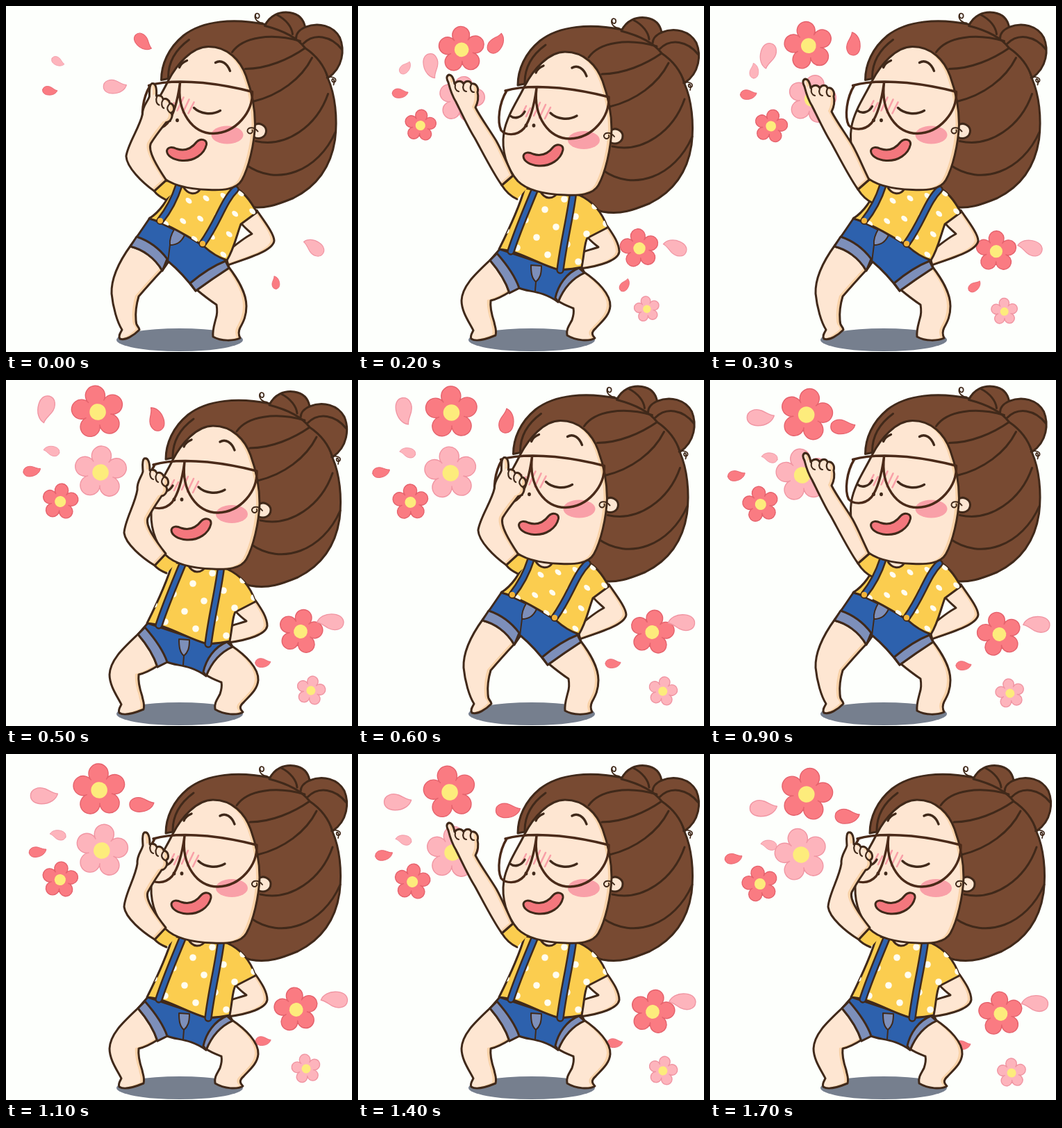
Animation, 498 px wide and 498 px high, one loop 1800 ms. Source, as an HTML page:

```html
<!DOCTYPE html>
<html>
<head>
<meta charset="utf-8">
<title>Dancing girl with petals</title>
<style>
html, body { margin: 0; width: 100%; height: 100%; overflow: hidden; background: #fdfffc; }
svg { display: block; width: 100vw; height: 100vh; }
</style>
</head>
<body>
<svg id="stage" viewBox="0 0 498 498" stroke-linecap="round" stroke-linejoin="round"></svg>
<script>
const STEP = 100, STEPS = 18, SETTLE = 5, SWING = 9; // steps until settled, steps per swing
const LINE = '#40291a', SKIN = '#fee6d2', SHADE = '#f9d2a8', HAIR = '#784a32', SHIRT = '#fbcd4f';
const BLUE = '#2d61ad', CUFF = '#7d8fba', RED = '#fa7b82', PINK = '#fdb4bc', BLUSH = '#f9a0a8';
const EDGE = { [RED]: '#e5626c', [PINK]: '#f095a2' };
const stage = document.getElementById('stage');

const lerp = (a, b, t) => a + (b - a) * t;
const clamp = t => Math.max(0, Math.min(1, t));

// Blend two paths that share the same commands.
function mix(a, b, t) {
  const nums = b.match(/-?[\d.]+/g);
  let i = 0;
  return a.replace(/-?[\d.]+/g, n => +lerp(+n, +nums[i++], t).toFixed(2));
}

const path = (d, fill = 'none', stroke = LINE, width = 3) =>
  `<path d="${d}" fill="${fill}" stroke="${stroke}" stroke-width="${width}"/>`;
const ellipse = (x, y, rx, ry, fill) => `<ellipse cx="${x}" cy="${y}" rx="${rx}" ry="${ry}" fill="${fill}"/>`;
const group = (transform, inner) => `<g transform="${transform}">${inner}</g>`;
const clipped = (id, d, inner) =>
  `<clipPath id="${id}"><path d="${d}"/></clipPath><g clip-path="url(#${id})">${inner}</g>`;

// Skin with a soft shadow along its right side.
const skin = (id, d) =>
  path(d, SHADE, 'none') + clipped(id, d, group('translate(-5 -1)', path(d, SKIN, 'none'))) + path(d);

// Body parts: [squat, stand]
const body = {
  legL: ['M192 364C170 385 150 402 149 424C149 440 160 455 166 467C164 471 161 475 163 479C170 484 186 479 198 474C200 466 197 462 196 455C192 443 190 432 191 424C200 422 208 418 219 411L226 390L205 355Z',
         'M180 344C164 366 151 390 152 414C154 434 160 455 167 466C165 470 161 475 164 479C172 482 184 474 192 466C191 460 187 462 187 452C186 440 188 428 191 418C203 404 212 394 225 380L232 355L192 328Z'],
  legR: ['M324 382C345 396 364 415 363 432C362 446 350 455 342 464C335 470 337 474 341 478C333 483 314 482 301 474C299 465 305 458 308 452C310 446 311 440 310 435C302 432 296 430 287 424L286 402L310 376Z',
         'M320 375C333 392 346 412 346 432C346 446 342 454 337 463C334 469 335 474 337 478C328 482 310 483 298 476C297 466 300 458 302 450C304 444 304 436 303 430C294 424 286 418 274 408L268 392L306 366Z'],
  shorts: ['M204 350L190 366C202 380 212 394 218 413L232 406C246 412 264 409 288 426C296 406 308 392 326 384L322 376L291 379Z',
           'M207 305L179 346C196 350 214 362 225 381L234 368C246 378 258 390 273 410C284 402 304 388 321 377L318 366L284 342Z'],
  cuffL: ['M190 366C202 380 212 394 218 413L232 406C226 388 214 372 200 356Z',
          'M179 346C196 350 214 362 225 381L232 364C220 348 206 338 188 332Z'],
  cuffR: ['M288 426C296 406 308 392 326 384L318 377C300 384 288 402 284 420Z',
          'M273 410C284 402 304 388 321 377L316 367C298 374 278 388 265 399Z'],
  fly: ['M249 373L264 374C264 386 262 392 256 397C250 392 249 384 249 373Z',
        'M243 320L257 330C252 340 246 344 236 344C235 336 238 328 243 320Z'],
  seam: ['M256 397L255 410', 'M236 344L233 368'],
  armR: ['M359 317C368 330 376 342 376 354C374 366 350 374 320 378L318 356C328 352 338 350 346 347C340 342 334 338 330 332Z',
         'M361 294C372 310 386 328 386 338C384 352 352 362 316 374L318 354C330 344 342 334 354 328C348 322 342 318 338 312Z'],
  shirt: ['M240 262C232 290 218 320 203 350C232 352 260 372 290 380C302 379 312 378 322 376C326 355 326 340 330 334L359 319C352 298 340 282 318 272L288 268C280 280 268 278 262 266Z',
          'M242 258C232 280 222 296 206 306C230 312 260 330 285 346C296 356 306 362 318 366C328 350 332 330 338 314L361 297C354 284 344 268 330 262L280 263C274 273 262 272 255 260Z'],
  strapL: ['M255 263C244 290 230 322 220 353', 'M249 258C242 280 234 294 222 309'],
  strapR: ['M309 274C304 310 296 340 291 380', 'M330 264C312 282 306 310 283 342']
};

// Front arm: [at glasses, raised]
const front = {
  sleeve: ['M258 250L229 251L214 267C219 273 226 276 231 278', 'M256 248L223 244L207 258C212 266 220 274 229 278'],
  arm: ['M214 267C196 256 172 236 170 220C171 202 186 178 189 158C188 146 195 140 197 132C197 126 195 116 199 113C205 111 207 120 207 130C212 128 216 130 217 134C222 132 226 135 227 139C234 140 236 150 230 153C234 158 230 166 224 167C218 176 212 184 204 199C200 210 216 232 230 250Z',
        'M207 258C194 240 178 208 168 190C160 178 148 152 141 138C136 130 132 118 130 110C128 106 126 101 131 99C136 99 138 106 139 112C144 106 150 108 152 112C156 106 162 108 163 112C170 110 174 118 172 124C174 132 172 140 169 146C176 160 188 176 199 194C207 208 215 228 223 244Z'],
  knuckles: ['M208 131C206 136 208 142 212 143M217 135C214 140 216 146 219 147M227 140C222 146 224 150 229 153',
             'M140 113C139 118 141 122 145 123M152 113C150 118 152 123 156 123M163 113C160 119 163 124 167 124']
};

const hair =
  path('M230 114C230 92 240 68 262 50C290 28 335 25 380 34L430 48C452 65 464 90 470 112C480 135 484 168 480 200C474 240 452 268 420 284C398 293 378 301 352 296C335 292 326 284 322 272L300 100Z', HAIR) +
  path('M379 36C386 21 400 15 415 17C428 19 435 27 437 38C456 30 478 36 487 53C494 70 492 96 470 111C464 92 452 78 437 68C428 56 410 44 379 36Z', HAIR) +
  path('M240 110C240 92 248 72 270 56M332 74C347 52 388 46 430 58M351 98C382 98 414 84 437 68M362 145C400 136 432 112 447 82M366 202C410 212 454 180 470 134M352 236C396 268 456 246 481 188M396 20C410 27 418 38 419 48M437 38C428 42 424 48 424 54M434 62C450 46 474 50 490 70') +
  path('M376 32C370 32 364 27 365 21C366 16 372 18 371 23C370 27 364 25 366 19M468 111C472 108 482 110 481 115C480 119 474 117 476 113C478 111 480 116 478 121', 'none', LINE, 1.8);

const face =
  path('M364 179C370 174 381 179 381 187C381 196 371 201 363 196', SKIN) +
  skin('face', 'M240 115C252 92 274 66 298 66C326 66 344 86 352 108C360 130 365 154 365 178C364 206 356 240 346 258C338 272 318 273 298 272C268 271 244 266 230 252C214 234 206 208 210 182C214 158 230 136 240 115Z') +
  ellipse(325, 193, 23, 13, BLUSH) +
  path('M236 156L242 144M242 159L248 147M253 158L262 139M261 161L270 142M269 162L277 146', 'none', BLUSH, 2.6) +
  path('M256 96C258 91 262 88 267 86M308 89C316 84 325 90 329 101M219 158C225 163 235 161 240 152M277 154C286 163 303 165 315 158', 'none', LINE, 3.4) +
  ellipse(242, 172, 2.4, 2.8, LINE) + ellipse(253, 172, 2.4, 2.8, LINE) +
  path('M238 216C239 210 246 210 252 213C264 217 274 212 281 203C287 197 296 200 295 207C292 221 277 231 260 230C247 229 238 223 238 216Z', '#f3777d') +
  path('M214 122C203 140 200 166 206 179C212 186 228 188 239 176C248 164 254 140 257 118C252 160 275 191 305 191C338 190 362 160 361 131M212 122C232 116 256 115 290 118C318 121 342 126 361 131', 'none', '#4a2a19', 3.4) +
  path('M369 188C363 180 353 182 354 188C356 193 363 191 361 186', 'none', LINE, 2);

// Each drifts from one point to another, then sways and sinks.
// rest: final angle, open: extra angle at the start, flip: tumble on the way
const petals = [
  { color: RED, size: 35, from: [209, 52], to: [203, 56], sway: 13, phase: 0.1, rest: 0, open: 45, flip: -115 },
  { color: PINK, size: 39, from: [147, 116], to: [63, 42], sway: 14, phase: 2, rest: 0, open: 0, flip: 115 },
  { color: PINK, size: 23, from: [64, 80], to: [75, 102], sway: 11, phase: 2.6, rest: -165, open: 195, flip: 0 },
  { color: RED, size: 25, from: [64, 122], to: [39, 131], sway: 7, phase: -1.8, rest: -8, open: 15, flip: 0 },
  { color: PINK, size: 38, from: [442, 347], to: [469, 348], sway: 3.5, phase: -2.2, rest: 186, open: 30, flip: 0 },
  { color: RED, size: 22, from: [391, 398], to: [368, 407], sway: 4, phase: -1.1, rest: 0, open: -95, flip: 0 }
];
const flowers = [
  { color: RED, size: 38, from: [160, 74], to: [135, 46], sway: 4, phase: 2.4 },
  { color: PINK, size: 38, from: [154, 136], to: [135, 133], sway: 4, phase: -1.3 },
  { color: RED, size: 26, from: [96, 170], to: [76, 175], sway: 4, phase: -1 },
  { color: RED, size: 32, from: [399, 340], to: [420, 362], sway: 4, phase: 0.1 },
  { color: PINK, size: 21, from: [408, 429], to: [435, 447], sway: 4, phase: 0.3 }
];

function drift({ from, to, sway, phase }, step) {
  const t = clamp(step / SETTLE), late = step - SETTLE;
  const swing = Math.cos(2 * Math.PI * late / SWING - phase);
  const fall = 0.2 + sway / 5; // wide swingers sink faster
  return { x: lerp(from[0], to[0], t) + sway * swing, y: lerp(from[1], to[1], t) + fall * Math.max(0, late), swing, t };
}

function petal(p, step) {
  const { x, y, t } = drift(p, step);
  const turn = p.rest + p.open * (1 - t) + p.flip * Math.sin(Math.PI * clamp(step / 8));
  return group(`translate(${x} ${y}) rotate(${turn}) scale(${p.size * lerp(0.85, 1, t) / 40})`,
    path('M-20 0C-20 -10 -8 -14 2 -10C9 -7 14 -3 20 -3C18 5 9 12 -4 12C-14 12 -20 7 -20 0Z', p.color, EDGE[p.color], 1.4));
}

function flower(f, step) {
  if (step < 1) return '';
  const { x, y, swing, t } = drift(f, step);
  const r = f.size * lerp(0.8, 1, t);
  const at = i => {
    const a = (-126 + 72 * i) * Math.PI / 180;
    return `${r * 0.5 * Math.cos(a)} ${r * 0.5 * Math.sin(a)}`;
  };
  let d = 'M' + at(0);
  for (let i = 1; i <= 5; i++) d += `A${r * 0.37} ${r * 0.37} 0 1 1 ${at(i)}`;
  return group(`translate(${x} ${y}) rotate(${12 * swing})`,
    path(d + 'Z', f.color, EDGE[f.color], 1.4) + ellipse(0, 0, r * 0.31, r * 0.31, '#fdec7c'));
}

// Slanted lattice of dots, relative to the collar.
let dots = '';
for (let i = -4; i <= 4; i++)
  for (let j = -4; j <= 6; j++) dots += ellipse(28 * i + 16 * j - 18, 25 * j - 15 * i + 63, 4.8, 4.8, '#fffdf0');

function draw(step) {
  const beat = step % 6;
  const stand = 1 - beat % 3 / 2;
  const raise = (1 - Math.cos(Math.PI * clamp((beat < 3 ? beat : 5 - beat) / 2))) / 2;
  const part = name => mix(...body[name], stand);
  const limb = name => mix(...front[name], raise);
  const head = `translate(${-6.5 * stand} ${-7.5 * stand})`;
  const reach = `translate(${6 * stand * raise} ${6 * stand * raise}) rotate(${4.2 * stand * (1 - raise)} 222 258)`;
  const strap = name => path(part(name), 'none', LINE, 11.5) + path(part(name), 'none', BLUE, 6.5);
  const clip = (x, y) => ellipse(x, y, 4 * stand, 4 * stand, '#f3b43a');
  const lean = mix('matrix(1 0 0 1 275 270)', 'matrix(.926 .323 .071 .828 267 263)', stand);

  stage.innerHTML =
    flowers.map(f => flower(f, step)).join('') +
    petals.map(p => petal(p, step)).join('') +
    ellipse(250, 480.5, 91, 16.5, '#767f8e') +
    group(head, hair) +
    skin('legL', part('legL')) + skin('legR', part('legR')) + skin('armR', part('armR')) +
    path(part('shorts'), BLUE) + path(part('cuffL'), CUFF) + path(part('cuffR'), CUFF) +
    path(part('fly'), CUFF, LINE, 2) + path(part('seam'), 'none', LINE, 2) +
    ellipse(275 - 8 * stand, 268 - 7 * stand, 15, 10, SKIN) +
    path(part('shirt'), SHIRT) +
    clipped('shirt', part('shirt'), group(lean, dots)) +
    group(reach, path(limb('sleeve'), SHIRT)) +
    strap('strapL') + strap('strapR') + clip(222, 309) + clip(283, 342) +
    group(head, face) +
    group(reach, skin('arm', limb('arm')) + path(limb('knuckles'), 'none', LINE, 2.2));
}

let shown = -1;
const start = performance.now();
function tick() {
  const step = Math.floor((performance.now() - start) / STEP) % STEPS;
  if (step !== shown) draw(shown = step);
  requestAnimationFrame(tick);
}
tick();
</script>
</body>
</html>
```
